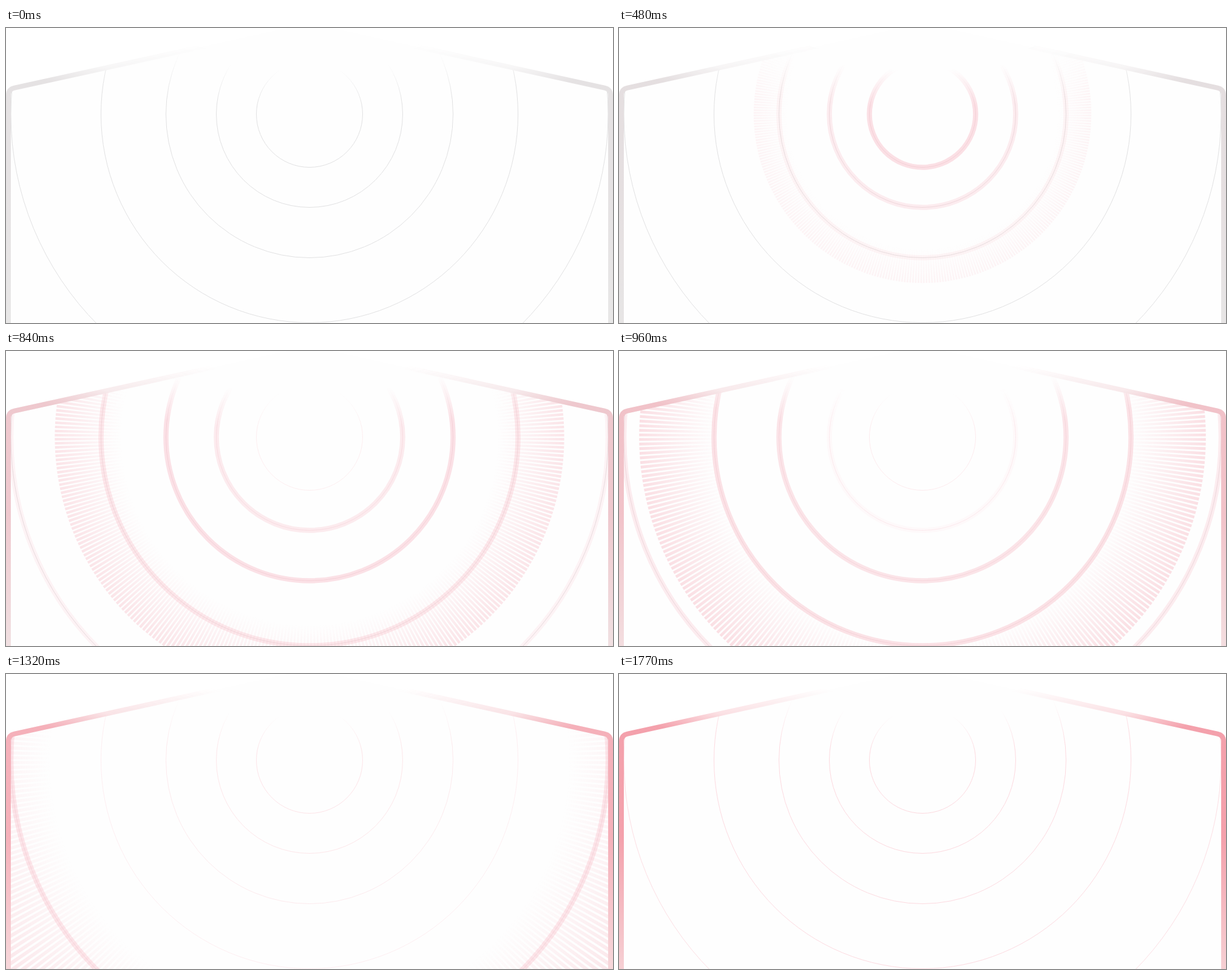
An HTML page that plays this animation: 1000x486 px, repeating every 1800 ms.

```html
<!DOCTYPE html>
<html lang="en">
<head>
<meta charset="utf-8">
<title>Pulse</title>
<style>
  html, body { margin: 0; width: 100%; height: 100%; overflow: hidden; background: #fff; }
  svg { display: block; width: 100%; height: 100%; }
</style>
</head>
<body>
<svg viewBox="0 0 1000 486" fill="none">
  <defs>
    <radialGradient id="ringFade" gradientUnits="userSpaceOnUse" cx="0" cy="0" r="1.5" gradientTransform="translate(500 0) scale(376 98)">
      <stop offset=".47" stop-color="#fff" stop-opacity="0"/>
      <stop offset=".88" stop-color="#fff"/>
    </radialGradient>
    <radialGradient id="greyFade" gradientUnits="userSpaceOnUse" cx="0" cy="0" r="1.5" gradientTransform="translate(500 0) scale(376 98)">
      <stop offset=".36" stop-color="#fff" stop-opacity="0"/>
      <stop offset=".74" stop-color="#fff" stop-opacity=".3"/>
      <stop offset=".97" stop-color="#fff"/>
    </radialGradient>
    <radialGradient id="roseFade" gradientUnits="userSpaceOnUse" cx="0" cy="0" r="1.5" gradientTransform="translate(500 0) scale(376 98)">
      <stop offset=".32" stop-color="#fff" stop-opacity="0"/>
      <stop offset=".74" stop-color="#fff" stop-opacity=".32"/>
      <stop offset=".97" stop-color="#fff"/>
    </radialGradient>
    <linearGradient id="grey" gradientUnits="userSpaceOnUse" x1="0" y1="0" x2="0" y2="486">
      <stop offset=".55" stop-color="#e5e2e3"/>
      <stop offset="1" stop-color="#e8e7e7"/>
    </linearGradient>
    <linearGradient id="rose" gradientUnits="userSpaceOnUse" x1="0" y1="0" x2="0" y2="486">
      <stop offset=".55" stop-color="#f4a1ac"/>
      <stop offset="1" stop-color="#f6d0d4"/>
    </linearGradient>
    <radialGradient id="rayFill" gradientUnits="userSpaceOnUse" cx="500" cy="142" r="1">
      <stop id="rayInner" stop-color="#f0788c" stop-opacity="0"/>
      <stop offset="1" stop-color="#f0788c" stop-opacity=".23"/>
    </radialGradient>
    <mask id="ringMask" maskUnits="userSpaceOnUse" x="0" y="0" width="1000" height="486">
      <path fill="url(#ringFade)" d="M0 0H1000V486H0Z"/>
    </mask>
    <mask id="greyMask" maskUnits="userSpaceOnUse" x="0" y="0" width="1000" height="486">
      <path fill="url(#greyFade)" d="M0 0H1000V486H0Z"/>
    </mask>
    <mask id="roseMask" maskUnits="userSpaceOnUse" x="0" y="0" width="1000" height="486">
      <path fill="url(#roseFade)" d="M0 0H1000V486H0Z"/>
    </mask>
    <path id="edge" d="M4 500V111Q4 100.900 14 98.700L500 -8L986 98.700Q996 100.900 996 111V500"/>
    <clipPath id="panel"><path d="M8 500V110Q8 104 14 102.700L500 -4L986 102.700Q992 104 992 110V500Z"/></clipPath>
  </defs>
  <use href="#edge" fill="#fefefe"/>
  <g clip-path="url(#panel)">
    <g id="rings" mask="url(#ringMask)">
      <circle id="rays" cx="500" cy="142" pathLength="384" stroke="url(#rayFill)" stroke-dasharray=".62 .38" stroke-dashoffset="-.19"/>
    </g>
  </g>
  <g stroke-width="8">
    <g mask="url(#greyMask)"><use href="#edge" id="rim" stroke="url(#grey)"/></g>
    <g mask="url(#roseMask)"><use href="#edge" id="glow" stroke="url(#rose)"/></g>
  </g>
</svg>
<script>
const LOOP = 1800, STEP = 30;
const $ = id => document.getElementById(id);
const set = (el, attrs) => { for (const k in attrs) el.setAttribute(k, attrs[k]); };
const clamp = x => Math.min(1, Math.max(0, x));
const ramp = (t, a, b) => clamp((t - a) / (b - a));
const mix = (a, b, p) => a.map((v, i) => Math.round(v + (b[i] - v) * p));

const GREY = [225, 225, 226], PINK = [252, 217, 223];

function addCircle(r, attrs) {
  const c = document.createElementNS('http://www.w3.org/2000/svg', 'circle');
  set(c, { cx: 500, cy: 142, r, ...attrs });
  return $('rings').appendChild(c);
}

// radius, then start, peak and end of the pulse in ms
const rings = [
  [87.5, 60, 480, 800],
  [153.5, 180, 680, 1010],
  [236.5, 320, 860, 1190],
  [343.5, 480, 1000, 1310],
  [492, 660, 1150, 1680]
].map(([r, start, peak, end]) => ({
  start, peak, end,
  line: addCircle(r, { 'stroke-width': 1 }),
  band: addCircle(r, { 'stroke-width': 8.5, stroke: '#f0788c' })
}));

function draw(t) {
  for (const { start, peak, end, line, band } of rings) {
    const pulse = ramp(t, start, peak) * (1 - ramp(t, peak + 60, end));
    const passed = ramp(t, start, end);
    set(band, { 'stroke-opacity': 0.22 * pulse });
    set(line, {
      stroke: `rgb(${mix(GREY, PINK, passed)})`,
      'stroke-opacity': 1 - 0.6 * passed + 0.6 * ramp(t, end, LOOP)
    });
  }

  const outer = 89.5 + 0.393 * t;
  const inner = Math.min(outer - 1, 105 + 0.243 * t);
  set($('rayFill'), { r: outer });
  set($('rayInner'), { offset: inner / outer });
  set($('rays'), {
    r: (outer + inner) / 2,
    'stroke-width': outer - inner,
    opacity: ramp(t, 240, 960) * (1 - ramp(t, 1200, 1680))
  });

  const glow = 1 - (1 - ramp(t, 450, LOOP)) ** 1.7;
  set($('glow'), { opacity: glow });
  set($('rim'), { opacity: 1 - glow ** 2 });
}

function tick() {
  const t = Math.floor(performance.now() % LOOP / STEP) * STEP;
  draw(t < 60 ? 0 : t);
  requestAnimationFrame(tick);
}
tick();
</script>
</body>
</html>
```
